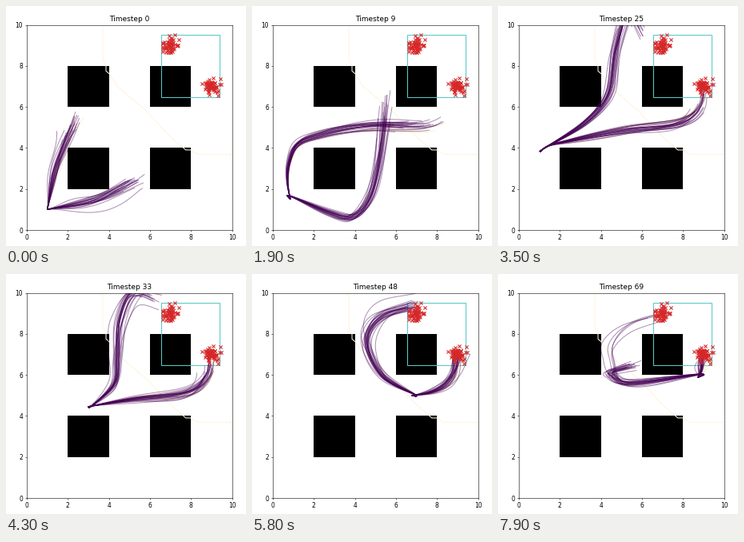
Write a matplotlib script that moves like this. It is 300 by 300 pixels and loops after 8000 ms.

```python
import numpy as np
import matplotlib.pyplot as plt
from matplotlib.animation import FuncAnimation
from matplotlib.collections import LineCollection
from matplotlib.patches import Rectangle

HOLD, FRAMES, INTERVAL = 10, 80, 100
PLANS, OUTLIERS, HORIZON = 26, 5, 10
PURPLE, TEAL, CREAM, PALE = "#440154", "#5cc8c8", "#fff5dc", "#fde9b0"
S = np.linspace(0, 1, 80)
rng = np.random.default_rng(7)

# The way the vehicle drives, and the goal at its end
ROAD = [(1, 1), (.88, 1.4), (.72, 2.3), (.8, 3.2), (1.25, 4), (2.5, 4.35),
        (5.1, 4.82), (7.7, 5.15), (8.75, 5.9), (9, 7.1)]

# First guesses, one for each side of the lower left block
FANS = [[(1.45, 3.2), (2.5, 5.75)], [(3.5, 1.5), (5.7, 2.55)]]

# Waypoints of the other way round: below the block, later above it
SWITCH = 21
LOW_STEPS, LOW = [9, 16], np.array([
    [(2.8, .85), (3.9, .65), (4.75, 1.6), (5.25, 3.6), (5.6, 6.8)],
    [(2.6, .9), (3.5, .5), (4.2, 1.4), (4.65, 4), (4.95, 7.8)]])
HIGH_STEPS, HIGH = [25, 41, 55, 69], np.array([
    [(3.2, 5.2), (4.35, 6.6), (4.7, 8.8), (5.3, 10.5), (6.1, 9.3)],
    [(5.4, 5.95), (4.6, 7.2), (4.5, 8.4), (5.2, 9.4), (6.9, 10)],
    [(5.4, 5.75), (4.65, 6.9), (4.65, 7.7), (5.5, 8.5), (7.15, 9)],
    [(5.5, 5.6), (4.6, 5.95), (4.55, 6.15), (5.1, 6.3), (5.8, 6.5)]])


def tween(step, steps, shapes):
    i = np.interp(step, steps, range(len(steps)))
    a = min(int(i), len(steps) - 2)
    return shapes[a] + (i - a) * (shapes[a + 1] - shapes[a])


def sample(curve, at):
    """Points of an evenly spaced curve at the given fractions."""
    grid = np.linspace(0, 1, len(curve))
    return np.column_stack([np.interp(at, grid, curve[:, k]) for k in (0, 1)])


def spline(points, n=len(S)):
    """Catmull-Rom curve with evenly spaced points, and its length."""
    p = np.array(points, float)
    p = np.vstack([2 * p[0] - p[1], p, 2 * p[-1] - p[-2]])
    u = np.linspace(0, len(p) - 3, 240)
    i = np.minimum(u.astype(int), len(p) - 4)
    f = (u - i)[:, None]
    a, b, c, d = p[i], p[i + 1], p[i + 2], p[i + 3]
    q = b + f * (c - a + f * (2 * a - 5 * b + 4 * c - d
                              + f * (3 * (b - c) + d - a))) / 2
    dist = np.r_[0, np.cumsum(np.hypot(*np.diff(q, axis=0).T))]
    even = np.linspace(0, dist[-1], n)
    return np.column_stack([np.interp(even, dist, q[:, k]) for k in (0, 1)]), dist[-1]


road, LENGTH = spline(ROAD, 300)


def progress(step):
    """Distance driven: slow start, fast middle, slow end."""
    def ease(t):
        return 1 / (1 + np.exp((35 - t) / 10.5))
    return 11.9 * (ease(step) - ease(0))


def along(dist):
    return sample(road, np.atleast_1d(dist) / LENGTH)


def direct_route(step):
    start = progress(step)
    curve = along(start + S * min(HORIZON, LENGTH - start))
    sway = .35 * np.cos(.45 * (step - 9)) * np.exp((9 - step) / 12)
    curve[:, 1] += sway * np.sin(np.pi * S) ** 2 * (step >= 2)
    return curve


def detour(step, circling=False):
    start = progress(step)
    coast = along([start, start + .18])
    if step < SWITCH:
        way = tween(step, LOW_STEPS, LOW)
    else:
        way = tween(min(step, 55) if circling else step, HIGH_STEPS, HIGH)
    return spline([*coast, *way])[0]


def with_fan(route, fan, step):
    w = max(0, 1 - step / 9)
    guess = spline([along(progress(step))[0], *fan])[0]
    return (1 - w) * route + w * guess


class Bundle:
    """Plans scattered smoothly around a common route."""

    def __init__(self, count, outliers, spread=.14):
        self.cut = rng.random(count)
        self.noise = spread * rng.normal(size=(2, count, 3, 2))
        self.noise[:, :outliers] *= 2

    def lines(self, routes, step):
        cut = .05 + .22 * (1 - progress(step) / LENGTH)
        noise = self.noise[0] * np.cos(.2 * step) + self.noise[1] * np.sin(.2 * step)
        waves = np.column_stack([S ** 1.2, .7 * np.sin(np.pi * S) ** 1.5,
                                 .35 * S * np.sin(2 * np.pi * S)])
        return [sample(route, S * (1 - cut * c)) + waves @ n
                for route, c, n in zip(routes, self.cut, noise)]


direct, around = Bundle(PLANS, 3), Bundle(PLANS, OUTLIERS)
faint = Bundle(4, 0)

plt.rcParams["xtick.labelsize"] = plt.rcParams["ytick.labelsize"] = 10.8
fig = plt.figure(figsize=(6, 6), dpi=50)
ax = fig.add_axes([26 / 300, 20 / 300, 256.5 / 300, 256.5 / 300])
ax.set(xlim=(0, 10), ylim=(0, 10), xticks=range(0, 11, 2), yticks=range(0, 11, 2))
title = ax.set_title("Timestep 0", fontsize=12.9)

for x in (2, 6):
    for y in (2, 6):
        ax.add_patch(Rectangle((x, y), 2, 2, fc="black", lw=0))

border = [(3.7, 10), (3.7, 8.35), (3.86, 7.97), (3.86, 7.75), (4.05, 7.58), (4.4, 7),
          (5.8, 5.83), (7, 4.55), (7.75, 3.9), (8, 3.9), (8.32, 3.69), (10, 3.68)]
ax.plot(*zip(*border), color=CREAM, lw=1.5, zorder=1.5)
ax.add_patch(Rectangle((6.55, 6.46), 2.84, 3.07, fill=False, ec=TEAL, lw=1.5,
                       zorder=1.6))

pale = ax.add_collection(LineCollection([], colors=PALE, lw=1.5, alpha=.5, zorder=1.9))
plans = ax.add_collection(LineCollection([], colors=PURPLE, lw=1.5, alpha=.42,
                                         zorder=2))

for goal in ((7.03, 9), (8.97, 6.95)):
    marks = goal + np.clip(rng.normal(0, .2, (60, 2)), -.45, .53)
    ax.scatter(*marks.T, marker="x", color="tab:red", zorder=3)


def update(i):
    step = max(0, i - HOLD)
    straight = with_fan(direct_route(step), FANS[0], step)
    main, circling = (with_fan(detour(step, c), FANS[1], step) for c in (False, True))
    detours = [circling] * OUTLIERS + [main] * (PLANS - OUTLIERS)
    plans.set_segments(direct.lines([straight] * PLANS, step)
                       + around.lines(detours, step))
    pale.set_segments(faint.lines([straight + S[:, None] * (.2, 0)] * 4, step))
    title.set_text(f"Timestep {step}")
    return plans, pale, title


anim = FuncAnimation(fig, update, frames=FRAMES, interval=INTERVAL, repeat=True,
                     repeat_delay=0, blit=False)
plt.show()
```
